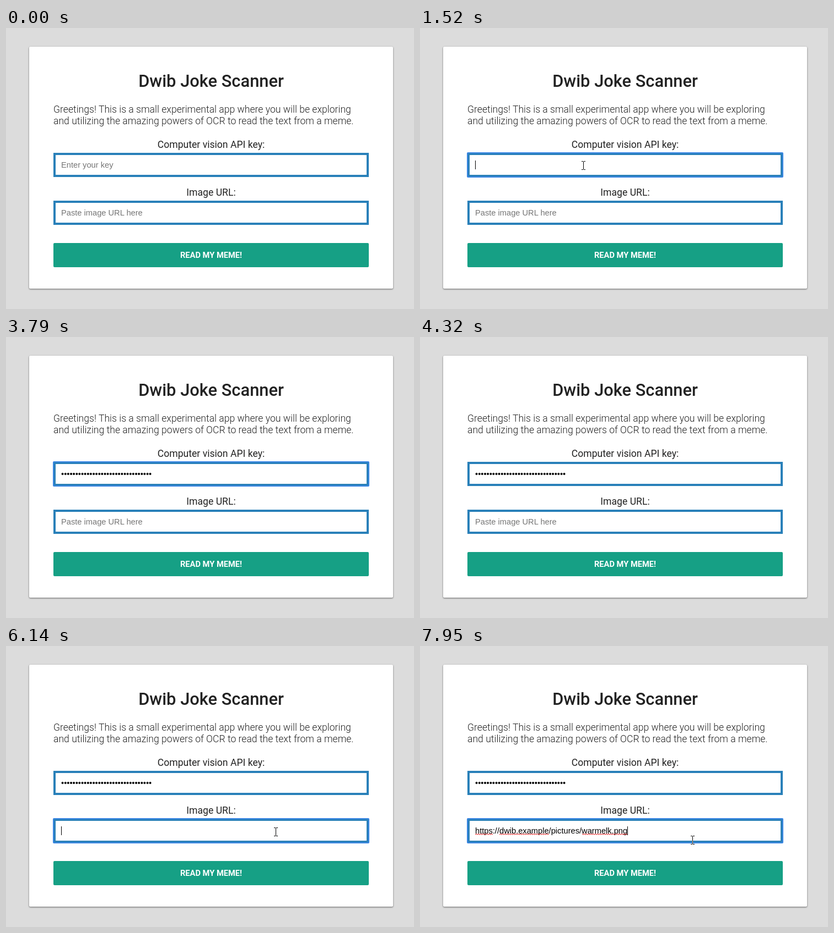
An HTML page that plays this animation: 740x511 px, repeating every 8000 ms.

```html
<!DOCTYPE html>
<html lang="en">
<head>
<meta charset="utf-8">
<title>Dwib Joke Scanner</title>
<style>
  html, body { margin: 0; width: 100%; height: 100%; overflow: hidden; background: #dcdcdc; }
  .card {
    position: absolute; left: 42px; top: 34px; width: 660px; height: 440px;
    background: #fff; border-radius: 2px;
    box-shadow: 0 1px 3.3px rgba(0, 0, 0, .24), 0 1.1px 2.2px rgba(0, 0, 0, .36);
  }
  svg { position: absolute; left: 0; top: 0; }
  text { font: 17.6px Roboto, sans-serif; fill: #222; }
  .mid { text-anchor: middle; }
  .title { font-size: 30.8px; font-weight: 500; }
  .intro { font-weight: 300; }
  .field { fill: #fff; stroke: #2980b9; stroke-width: 4; }
  .button { fill: #16a085; }
  .action { font-size: 14.667px; font-weight: 700; fill: #fff; }
  .entry, .hint { font: 14.667px "Liberation Sans", Arial, sans-serif; fill: #000; }
  .hint { fill: #757575; }
  .ring { fill: none; stroke: #3b87e3; stroke-width: 2; }
  .beam { fill: #fff; mix-blend-mode: difference; }
  .arrow { fill: #fff; stroke: #000; }

  /* One 8 s loop with hard steps: 1% = 80 ms */
  .anim { animation: 8s step-end infinite; }
  .key-hint { animation-name: key-hint; }
  .key-ring { animation-name: key-ring; }
  .key-text { animation-name: key-text; }
  .key-caret { animation-name: key-caret; }
  .url-hint { animation-name: url-hint; }
  .url-ring { animation-name: url-ring; }
  .url-text { animation-name: url-text; }
  .url-caret { animation-name: url-caret; }
  .squiggle { animation-name: squiggle; }
  .arrow { animation-name: arrow; }
  .beam { animation-name: beam; }

  @keyframes key-hint { 0% { opacity: 1 } 19%, 100% { opacity: 0 } }
  @keyframes key-ring { 0% { opacity: 0 } 19% { opacity: 1 } 54%, 100% { opacity: 0 } }
  @keyframes key-text { 0% { opacity: 0 } 41.25%, 100% { opacity: 1 } }
  @keyframes key-caret {
    0% { opacity: 0; transform: none }
    19% { opacity: 1; transform: none }
    25.875% { opacity: 0; transform: none }
    32.5% { opacity: 1; transform: none }
    39.375% { opacity: 0; transform: none }
    41.25% { opacity: 1; transform: translate(164px) }
    47.375%, 100% { opacity: 0; transform: translate(164px) }
  }
  @keyframes url-hint { 0% { opacity: 1 } 76.75%, 100% { opacity: 0 } }
  @keyframes url-ring { 0% { opacity: 0 } 76.75%, 100% { opacity: 1 } }
  @keyframes url-text { 0% { opacity: 0 } 87.125%, 100% { opacity: 1 } }
  @keyframes url-caret {
    0% { opacity: 0; transform: none }
    76.75% { opacity: 1; transform: none }
    83.75% { opacity: 0; transform: none }
    87.125% { opacity: 1; transform: translate(276px) }
    94% { opacity: 0; transform: translate(276px) }
    99.375%, 100% { opacity: 1; transform: translate(276px) }
  }
  @keyframes squiggle { 0% { opacity: 0 } 92.5%, 100% { opacity: 1 } }
  @keyframes arrow {
    0% { opacity: 0; transform: translate(654px, 72px) }
    7.375% { opacity: 1; transform: translate(654px, 72px) }
    9.25% { opacity: 1; transform: translate(548px, 126px) }
    10.75% { opacity: 1; transform: translate(432px, 191px) }
    12.25% { opacity: 1; transform: translate(371px, 227px) }
    14.125% { opacity: 0; transform: translate(371px, 227px) }
    68% { opacity: 1; transform: translate(646px, 311px) }
    69.5%, 100% { opacity: 0; transform: translate(646px, 311px) }
  }
  @keyframes beam {
    0% { opacity: 0; transform: translate(335px, 236px) }
    14.125% { opacity: 1; transform: translate(335px, 236px) }
    15.625% { opacity: 1; transform: translate(310px, 240px) }
    17.125% { opacity: 1; transform: translate(299px, 241px) }
    19% { opacity: 1; transform: translate(293px, 242px) }
    24.375% { opacity: 1; transform: translate(291px, 242px) }
    25.875% { opacity: 1; transform: translate(290px, 243px) }
    27.75% { opacity: 1; transform: translate(290px, 244px) }
    41.25% { opacity: 1; transform: translate(361px, 237px) }
    42.75% { opacity: 0; transform: translate(361px, 237px) }
    69.5% { opacity: 1; transform: translate(504px, 318px) }
    73% { opacity: 1; transform: translate(503px, 320px) }
    74.875% { opacity: 1; transform: translate(487px, 329px) }
    76.75% { opacity: 1; transform: translate(486px, 330px) }
    83.75% { opacity: 1; transform: translate(484px, 331px) }
    85.25% { opacity: 1; transform: translate(482px, 331px) }
    90.625% { opacity: 1; transform: translate(484px, 331px) }
    92.5% { opacity: 1; transform: translate(530px, 334px) }
    94% { opacity: 1; transform: translate(569px, 337px) }
    97.875% { opacity: 1; transform: translate(540px, 342px) }
    99.375%, 100% { opacity: 1; transform: translate(491px, 345px) }
  }
</style>
</head>
<body>
<div class="card"></div>
<svg width="740" height="511" viewBox="0 0 740 511">
  <defs>
    <pattern id="wave" width="4" height="3" y="341" patternUnits="userSpaceOnUse">
      <path d="M-1 3L2 .5L5 3" fill="none" stroke="#e00000"/>
    </pattern>
  </defs>

  <text class="mid title" x="372" y="107">Dwib Joke Scanner</text>
  <text class="intro" x="86" y="154">Greetings! This is a small experimental app where you will be exploring</text>
  <text class="intro" x="86" y="175">and utilizing the amazing powers of OCR to read the text from a meme.</text>

  <text class="mid" x="372" y="218">Computer vision API key:</text>
  <rect class="field" x="88" y="229" width="568" height="40"/>
  <rect class="anim ring key-ring" x="86" y="227" width="572" height="44" rx="1"/>
  <text class="anim hint key-hint" x="100" y="254">Enter your key</text>
  <text class="anim entry key-text" x="100" y="254">••••••••••••••••••••••••••••••••</text>
  <rect class="anim key-caret" x="100" y="241" width="1" height="16"/>

  <text class="mid" x="372" y="305">Image URL:</text>
  <rect class="field" x="88" y="316" width="568" height="40"/>
  <rect class="anim ring url-ring" x="86" y="314" width="572" height="44" rx="1"/>
  <text class="anim hint url-hint" x="100" y="341">Paste image URL here</text>
  <text class="anim entry url-text" x="100" y="341">https://dwib.example/pictures/warmelk.png</text>
  <path class="anim squiggle" fill="url(#wave)" d="M100 341h32v3h-32zM144 341h90v3h-90zM294 341h82v3h-82z"/>
  <rect class="anim url-caret" x="100" y="328" width="1" height="16"/>

  <rect class="button" x="86" y="391" width="572" height="44" rx="2"/>
  <text class="mid action" x="372" y="418">READ MY MEME!</text>

  <path class="anim beam" d="M0 0h3v1h1v-1h3v1h-3v14h3v1h-3v-1h-1v1h-3v-1h3v-14h-3z"/>
  <path class="anim arrow" d="M.5 .5v16l3.7-3.6 2.5 5.6 2.2-1-2.5-5.5h5.1z"/>
</svg>
</body>
</html>
```
